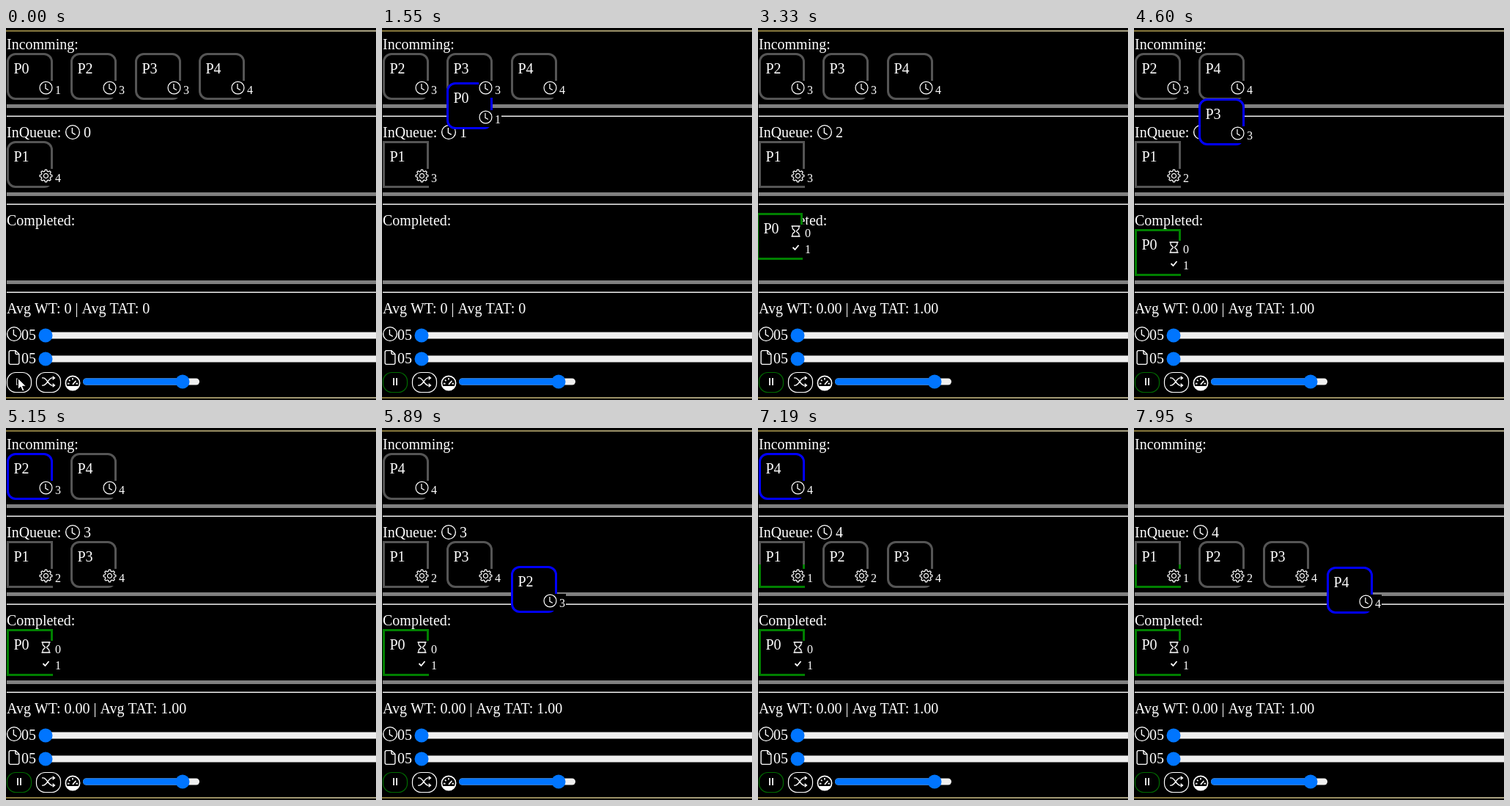
These frames come from a looping animation (505x507 px, 8 s). An HTML page with a canvas:

```html
<!DOCTYPE html>
<html lang="en">
<head>
<meta charset="utf-8">
<title>Scheduler</title>
<style>
html, body { margin: 0; width: 100%; height: 100%; overflow: hidden; background: #000; }
canvas { display: block; }
</style>
</head>
<body>
<canvas id="stage" width="505" height="507"></canvas>
<script>
const ctx = document.getElementById('stage').getContext('2d');
const LOOP = 8000, STEP = 70, SPRING = 2000;
const GRAY = '#555', BLUE = '#00f', GREEN = '#008000';
const ROW = { incoming: 34, queue: 154, done: 274 };
const arrival = { 0: 1, 2: 3, 3: 3, 4: 4 };

// Icons on a 16 unit grid
const gear = () => {
  let d = '';
  for (let i = 0; i <= 96; i++) {
    const a = i / 96 * 2 * Math.PI;
    const r = 6.6 + 0.9 * Math.tanh(3 * Math.cos(8 * a));
    d += (i ? 'L' : 'M') + (8 + r * Math.cos(a)) + ' ' + (8 + r * Math.sin(a));
  }
  return d + 'M10.7 8A2.7 2.7 0 1 1 5.3 8A2.7 2.7 0 1 1 10.7 8';
};
const icons = {
  clock: 'M15.5 8A7.5 7.5 0 1 1 .5 8A7.5 7.5 0 1 1 15.5 8M7.5 3.2V8.7L11 10.7',
  gear: gear(),
  file: 'M9.5 .5H4A1.5 1.5 0 0 0 2.5 2V14A1.5 1.5 0 0 0 4 15.5H12A1.5 1.5 0 0 0 13.5 14V4.5ZV3A1.5 1.5 0 0 0 11 4.5H13.5',
  glass: 'M2 1H14M2 15H14M3.5 1V3.5C3.5 6 7 6.5 7 8S3.5 10 3.5 12.5V15M12.5 1V3.5C12.5 6 9 6.5 9 8S12.5 10 12.5 12.5V15',
  check: 'M4 8l3 3 5-6',
  shuffle: 'M0 3.5H1.5C6 3.5 8 12.5 12.5 12.5H15M0 12.5H1.5C6 12.5 8 3.5 12.5 3.5H15M13 1.5l2.5 2-2.5 2M13 10.5l2.5 2-2.5 2',
  gauge: 'M15.5 8A7.5 7.5 0 1 1 .5 8A7.5 7.5 0 1 1 15.5 8M8 9.5L11.5 5.5M8 2.5V4.5M2.5 8.5H4.5M11.5 8.5H13.5M4 4.5L5.3 5.8'
};
for (const k in icons) icons[k] = new Path2D(icons[k]);

function rect(x, y, w, h, color) {
  ctx.fillStyle = color;
  ctx.fillRect(x, y, w, h);
}

function text(s, x, y, size = 20) {
  ctx.font = size + 'px "Liberation Serif", "Times New Roman", serif';
  ctx.fillStyle = '#fff';
  ctx.fillText(s, x, y);
}

function icon(name, cx, cy, size, weight = 1.1) {
  ctx.save();
  ctx.translate(cx - size / 2, cy - size / 2);
  ctx.scale(size / 16, size / 16);
  ctx.lineWidth = weight;
  ctx.strokeStyle = '#fff';
  ctx.stroke(icons[name]);
  ctx.restore();
}

function round(x, y, w, h, r) {
  ctx.beginPath();
  ctx.roundRect(x, y, w, h, r);
}

function slider(x, y, w, knob, filled) {
  round(x, y - 4.5, w, 9, 4.5);
  ctx.fillStyle = '#efefef';
  ctx.fill();
  if (filled) {
    round(x, y - 4.5, knob - x, 9, 4.5);
    ctx.fillStyle = '#0075ff';
    ctx.fill();
  }
  ctx.beginPath();
  ctx.arc(knob, y, 9.5, 0, 7);
  ctx.fillStyle = '#0075ff';
  ctx.fill();
}

function button(x, color) {
  round(x + .5, 469.5, 33, 27, 12);
  ctx.lineWidth = 1.2;
  ctx.strokeStyle = color;
  ctx.stroke();
}

// Remaining fraction of a springy flight, held for one step at a time
function spring(t, first, lead) {
  const k = (lead + Math.floor((t - first) / STEP) * STEP) / SPRING;
  return Math.cos(6.5 * Math.PI * k) * 2 ** (-10 * k);
}

const slotX = i => 1 + Math.round(87.4 * i);

function cardsAt(t) {
  const cards = [];
  const between = (a, b) => t >= a && t < b;
  const add = (id, slot, row, kind, num, more) =>
    cards.push({ id, x: slotX(slot), y: ROW[row], kind, num, color: GRAY, ...more });
  const drop = (id, slot, kind, num, first, lead, dx = 0) => {
    const u = spring(t, first, lead);
    add(id, slot, 'queue', kind, num, { x: slotX(slot) + dx * u, y: ROW.queue - 120 * u, color: BLUE });
  };

  const waiting = t < 1550 ? [0, 2, 3, 4] : t < 4140 ? [2, 3, 4] : t < 4600 ? [3, 2, 4]
    : t < 5610 ? [2, 4] : t < 7670 ? [4] : [];
  const picked = between(1090, 1550) || between(4140, 4600) || between(5150, 5610) || between(7190, 7670);
  waiting.forEach((id, i) =>
    add(id, i, 'incoming', 'clock', arrival[id], { color: picked && !i ? BLUE : GRAY }));

  add(1, between(2590, 3120) ? 1 : 0, 'queue', 'gear', t < 610 ? 4 : t < 3610 ? 3 : t < 6660 ? 2 : 1,
    { square: t >= 610, half: t >= 6660 });

  if (t >= 4600) {
    if (t < 5150) drop(3, 1, 'clock', 3, 4600, 85);
    else add(3, t < 6660 ? 1 : 2, 'queue', 'gear', 4);
  }

  if (between(1550, 2100)) drop(0, 1, 'clock', 1, 1550, 60);
  else if (between(2100, 2590)) drop(0, 0, 'gear', 1, 2100, 54, 8);
  else if (between(2590, 3120)) add(0, 0, 'queue', 'gear', 0, { square: true, color: GREEN });
  else if (t >= 3120) {
    const u = t < 3610 ? spring(t, 3120, 40) : 0;
    add(0, 0, 'done', 'result', 0,
      { x: 1 + 8.6 * u, y: ROW.done + 63 * u, square: true, color: GREEN });
  }

  if (between(5610, 6160)) drop(2, 2, 'clock', 3, 5610, 62);
  else if (between(6160, 6660)) drop(2, 1, 'gear', 2, 6160, 54);
  else if (t >= 6660) add(2, 1, 'queue', 'gear', 2);

  if (t >= 7670) drop(4, 3, 'clock', 4, 7670, 60);

  for (const c of cards) {
    c.x = Math.round(c.x);
    c.y = Math.round(c.y);
  }
  return cards;
}

function drawCard({ id, x, y, color, square, half }) {
  round(x, y, 63, 64, square ? 0 : 12);
  ctx.fillStyle = '#000';
  ctx.fill();
  const frame = c => {
    round(x + 1.5, y + 1.5, 60, 61, square ? 0 : 10.5);
    ctx.lineWidth = 3;
    ctx.strokeStyle = c;
    ctx.stroke();
  };
  frame(color);
  if (half) {
    ctx.save();
    ctx.beginPath();
    ctx.rect(x, y + 32, 63, 32);
    ctx.clip();
    frame(GREEN);
    ctx.restore();
  }
  text('P' + id, x + 9.5, y + 28);
}

function drawBadge({ x, y, kind, num }) {
  if (kind === 'result') {
    rect(x + 43, y + 16, 32, 45, '#000');
    icon('glass', x + 53.5, y + 25, 16, 1.3);
    text('0', x + 66, y + 33, 16);
    icon('check', x + 53.5, y + 47, 16, 1.8);
    text('1', x + 66, y + 55, 16);
    return;
  }
  rect(x + 44, y + 38, 31, 23, '#000');
  icon(kind, x + 53.5, y + 47.5, 18);
  text(num, x + 66, y + 56, 16);
}

function drawCursor(y) {
  ctx.save();
  ctx.translate(16, y);
  ctx.fillStyle = '#fff';
  ctx.strokeStyle = '#000';
  ctx.lineWidth = 1;
  const arrow = new Path2D('M.5 .5V15.5L4 12.2L6.5 18L9 17L6.6 11.3H11.5Z');
  ctx.fill(arrow);
  ctx.stroke(arrow);
  ctx.restore();
}

function drawControls(t) {
  icon('clock', 11, 417, 20);
  text('05', 21, 425);
  slider(46, 419, 480, 54);
  icon('file', 11, 449, 20);
  text('05', 21, 457);
  slider(46, 451, 480, 54);

  button(1, t < 340 ? '#fff' : '#006a00');
  if (t < 340) {
    ctx.beginPath();
    ctx.moveTo(14.5, 477.5);
    ctx.lineTo(21, 482);
    ctx.lineTo(14.5, 486.5);
    ctx.closePath();
    ctx.lineWidth = 1;
    ctx.strokeStyle = '#ccc';
    ctx.stroke();
  } else {
    rect(15, 477, 2, 10, '#ddd');
    rect(19, 477, 2, 10, '#ddd');
  }
  button(41, '#fff');
  icon('shuffle', 58, 482, 18, 1.2);

  icon('gauge', 91, 484, 20.5, 1.3);
  ctx.beginPath();
  ctx.arc(91, 484, 10, .42, Math.PI - .42);
  ctx.fillStyle = '#fff';
  ctx.fill();
  slider(105, 482, 159, 241, true);

  if (t < 940) drawCursor(t < 70 ? 477 : t < 140 ? 480 : 482);
}

function draw(t) {
  rect(0, 0, 505, 507, '#000');
  const edge = ctx.createLinearGradient(0, 0, 505, 0);
  edge.addColorStop(0, '#85763a');
  edge.addColorStop(1, '#aaa384');
  rect(0, 3, 505, 2, edge);
  rect(0, 503, 505, 2, edge);
  for (const y of [104, 224, 344]) {
    rect(1, y, 504, 5, '#808080');
    rect(1, y + 15.5, 504, 1.5, '#eee');
  }

  const done = t >= 3120;
  text('Incomming:', 1, 29);
  text('InQueue:', 1, 149);
  icon('clock', 91, 142, 20);
  text(t < 610 ? 0 : t < 2590 ? 1 : t < 3610 ? 2 : t < 6660 ? 3 : 4, 106, 149);
  text('Completed:', 1, 269);
  text(done ? 'Avg WT: 0.00 | Avg TAT: 1.00' : 'Avg WT: 0 | Avg TAT: 0', 1, 389);
  drawControls(t);

  const cards = cardsAt(t);
  cards.forEach(drawCard);
  cards.forEach(drawBadge);
}

const begin = performance.now();
function tick() {
  draw((performance.now() - begin) % LOOP);
  requestAnimationFrame(tick);
}
tick();
</script>
</body>
</html>
```
